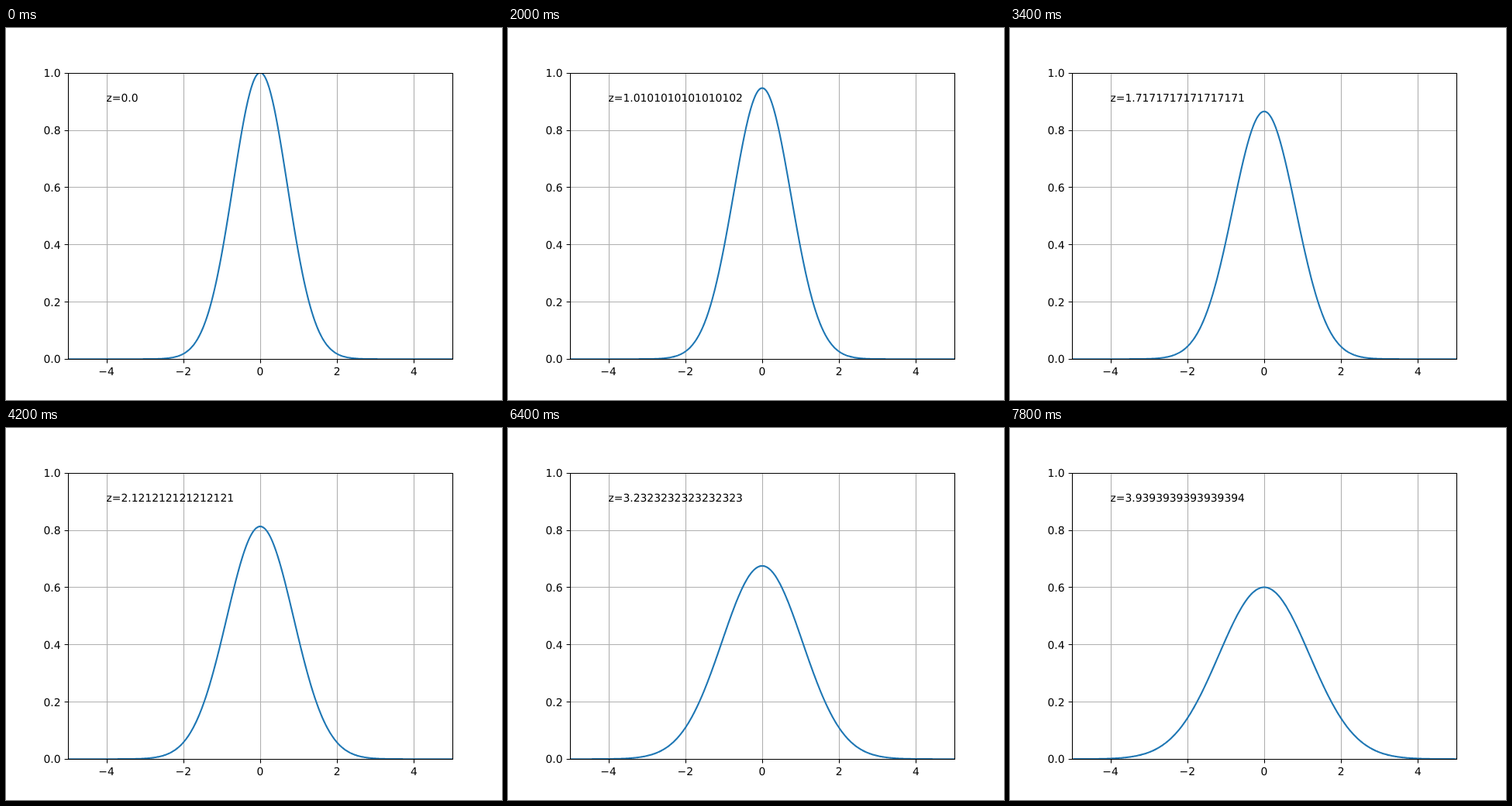
Write an HTML page that moves like this. It is 640 px wide and 480 px high and loops after 8000 ms.

```html
<!DOCTYPE html>
<html lang="en">
<head>
<meta charset="utf-8">
<title>Spreading beam profile</title>
<style>
  html, body { margin: 0; width: 100%; height: 100%; overflow: hidden; background: #fff; }
  svg { display: block; width: 640px; height: 480px; }
  text { font: 13.889px "DejaVu Sans", sans-serif; text-rendering: geometricPrecision; }
  path { fill: none; stroke-width: 1.111; }
  #grid { stroke: #b0b0b0; }
  #ticks, #frame { stroke: #000; }
  #curve { stroke: #1f77b4; stroke-width: 2.083; stroke-linejoin: round; }
</style>
</head>
<body>
<svg viewBox="0 0 640 480">
  <clipPath id="plot"><rect x="80" y="58" width="496" height="370"/></clipPath>
  <path id="grid"/>
  <path id="ticks"/>
  <g id="labels"></g>
  <g clip-path="url(#plot)"><path id="curve"/></g>
  <path id="frame" d="M80.5 58.5H576.5V427.5H80.5Z" stroke-linecap="square"/>
  <text id="readout" x="129.5" y="95"></text>
</svg>
<script>
const STEP_MS = 200, STEPS = 40;
const Z_STEP = 10 / 99;
const RAYLEIGH = Math.PI / 1.064;
const SAMPLES = 500;

const el = id => document.getElementById(id);
const toX = x => 328 + 49.6 * x;
const toY = y => 427.2 - 369.6 * y;
const snap = v => Math.round(v) + 0.5;

function addLabel(text, x, y, anchor) {
  const label = document.createElementNS(el("labels").namespaceURI, "text");
  label.setAttribute("x", x);
  label.setAttribute("y", y);
  label.setAttribute("text-anchor", anchor);
  label.textContent = text;
  el("labels").append(label);
}

function drawAxes() {
  let grid = "", ticks = "";
  for (let v = -4; v <= 4; v += 2) {
    const x = snap(toX(v));
    grid += `M${x} 58V428`;
    ticks += `M${x} 427.5V432.4`;
    addLabel(String(v).replace("-", "\u2212"), toX(v), 448, "middle");
  }
  for (let i = 0; i <= 5; i++) {
    const y = snap(toY(i / 5));
    grid += `M80 ${y}H576`;
    ticks += `M80.5 ${y}H75.6`;
    addLabel((i / 5).toFixed(1), 70.6, Math.round(toY(i / 5) + 5.28), "end");
  }
  el("grid").setAttribute("d", grid);
  el("ticks").setAttribute("d", ticks);
}

// Gaussian beam: the width grows and the peak falls with distance z.
function drawBeam(z) {
  const spread = 1 + (z / RAYLEIGH) ** 2;
  const points = [];
  for (let i = 0; i <= SAMPLES; i++) {
    const x = -5 + 10 * i / SAMPLES;
    const y = Math.exp(-x * x / spread) / Math.sqrt(spread);
    points.push(`${toX(x).toFixed(2)} ${toY(y).toFixed(3)}`);
  }
  el("curve").setAttribute("d", "M" + points.join("L"));
  el("readout").textContent = "z=" + (z === 0 ? "0.0" : z);
}

let shown = -1;
const start = performance.now();
function tick() {
  const step = Math.floor((performance.now() - start) / STEP_MS) % STEPS;
  if (step !== shown) drawBeam((shown = step) * Z_STEP);
  requestAnimationFrame(tick);
}

drawAxes();
tick();
</script>
</body>
</html>
```
